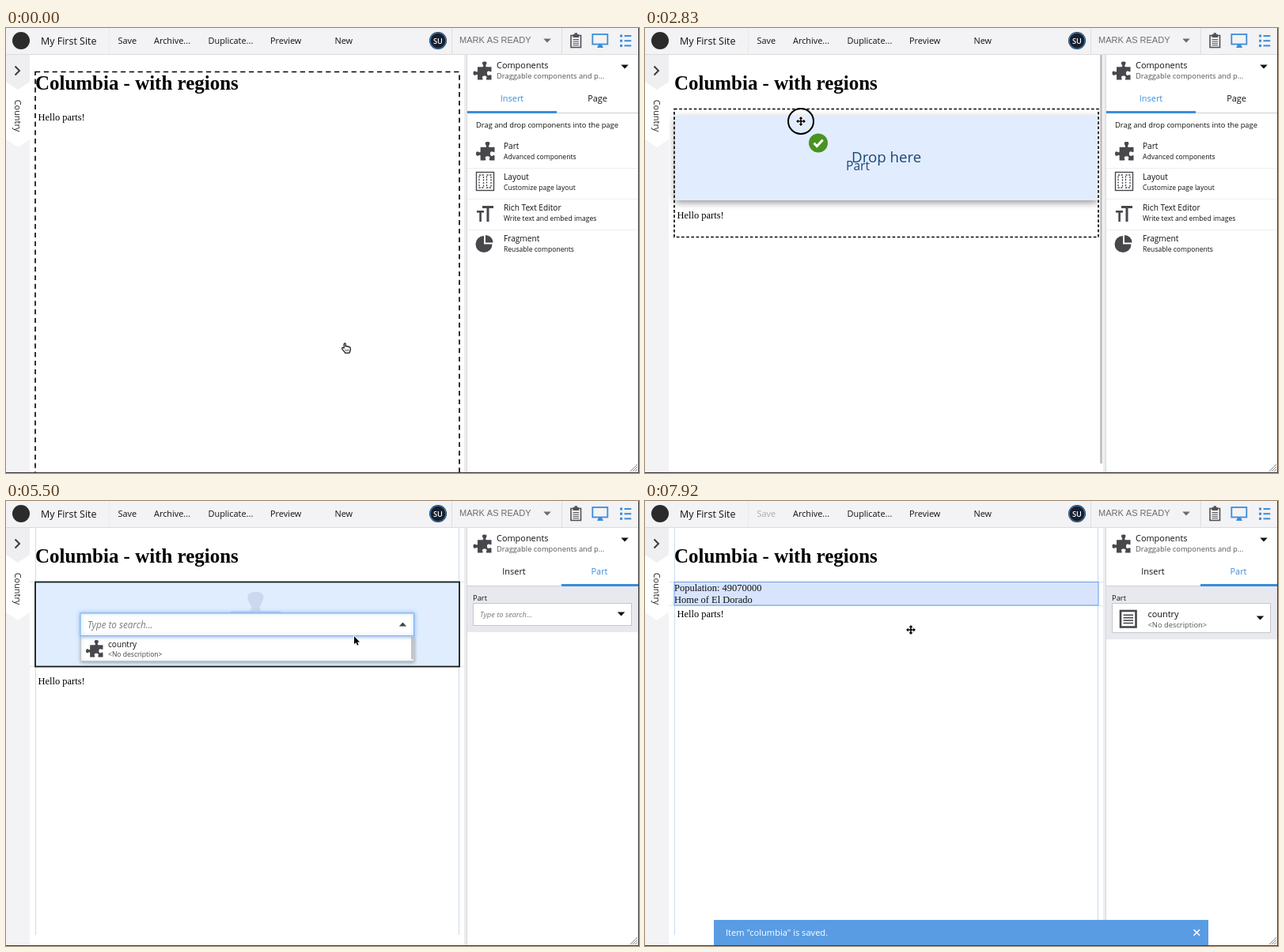
Animation, 800 px wide and 563 px high, one loop 8 s. Source, as an HTML page with a canvas:

```html
<!DOCTYPE html>
<html lang="en">
<head>
<meta charset="utf-8">
<title>Page editor</title>
<style>
html, body { margin: 0; width: 100%; height: 100%; overflow: hidden; background: #fff; }
canvas { display: block; width: 800px; height: 563px; }
</style>
</head>
<body>
<canvas id="stage" width="800" height="563"></canvas>
<script>
const ctx = document.getElementById('stage').getContext('2d');
const LOOP = 8000;
const SANS = '"Open Sans", sans-serif';
const SERIF = '"Liberation Serif", serif';
const ARIAL = '"Liberation Sans", sans-serif';
const BLUE = '#3a8ddb', ICON = '#47474c', BAR = '#f3f2f4', FORM = '#e8e9ee';

const PUZZLE = new Path2D('M24 29H50C56 29 57 25 54 19C46 6 50 0 62 0C74 0 78 6 70 19C67 25 68 29 74 29H100V52C100 56 96 57 91 54C80 48 76 56 76 64C76 72 80 80 91 74C96 71 100 73 100 77V100H76C71 100 70 96 72 92C78 84 72 78 62 78C52 78 46 84 52 92C54 96 53 100 48 100H24V77C24 71 20 70 15 73C5 79 0 73 0 64C0 55 5 49 15 55C20 58 24 57 24 51Z');
const CURSORS = {
  arrow: new Path2D('M0 0V10L2.3 8L4 11.6L5.6 10.9L4 7.4H7Z'),
  move: new Path2D('M0-6L2.5-3.2H.8V-.8H3.2V-2.5L6 0L3.2 2.5V.8H.8V3.2H2.5L0 6L-2.5 3.2H-.8V.8H-3.2V2.5L-6 0L-3.2-2.5V-.8H-.8V-3.2H-2.5Z'),
  hand: new Path2D('M-2.8 0V-5.2C-2.8-6.6-.8-6.6-.8-5.2V-2C-.4-3 1.2-2.8 1.3-1.8C2-2.5 3.2-2.1 3.3-1.2C4.2-1.7 5.3-1.2 5.3 0V2C5.3 4 4.2 5 4 6.2H-1.4C-2 4.5-4.5 2.5-5.3.8C-5.7-.4-4.4-1.1-3.6-.4Z')
};

// time, x, y
const PATH = [
  [0, 430, 405], [100, 430, 405], [780, 607, 157], [1100, 607, 157],
  [1420, 565, 147], [1680, 562, 146], [2420, 197, 118], [3600, 197, 118],
  [4420, 522, 153], [4700, 502, 157], [5300, 502, 157], [5500, 440, 171],
  [5720, 433, 175], [6720, 433, 175], [7350, 352, 132], [7550, 350, 133],
  [7900, 336, 163], [8000, 336, 163]
];

const ease = p => { p = Math.min(1, Math.max(0, p)); return p * p * (3 - 2 * p); };
const within = (t, a, b) => t >= a && t < b;

function pointerAt(t) {
  let i = 1;
  while (i < PATH.length - 1 && PATH[i][0] < t) i++;
  const [t0, x0, y0] = PATH[i - 1], [t1, x1, y1] = PATH[i];
  const k = ease((t - t0) / (t1 - t0));
  return [x0 + (x1 - x0) * k, y0 + (y1 - y0) * k];
}

function rect(x, y, w, h, fill, stroke, width = 1) {
  if (fill) { ctx.fillStyle = fill; ctx.fillRect(x, y, w, h); }
  if (stroke) { ctx.strokeStyle = stroke; ctx.lineWidth = width; ctx.strokeRect(x, y, w, h); }
}

function poly(points, fill) {
  ctx.beginPath();
  points.forEach(([x, y]) => ctx.lineTo(x, y));
  ctx.closePath();
  ctx.fillStyle = fill;
  ctx.fill();
}

function line(points, color, width) {
  ctx.beginPath();
  points.forEach(([x, y], i) => i ? ctx.lineTo(x, y) : ctx.moveTo(x, y));
  ctx.strokeStyle = color;
  ctx.lineWidth = width;
  ctx.stroke();
}

function circle(x, y, r, fill, stroke, width = 1) {
  ctx.beginPath();
  ctx.arc(x, y, r, 0, Math.PI * 2);
  if (fill) { ctx.fillStyle = fill; ctx.fill(); }
  if (stroke) { ctx.strokeStyle = stroke; ctx.lineWidth = width; ctx.stroke(); }
}

function text(s, x, y, size, color = '#111', family = SANS, style = '', align = 'left') {
  ctx.font = `${style} ${size}px ${family}`;
  ctx.textAlign = align;
  ctx.fillStyle = color;
  ctx.fillText(s, x, y);
}

function caret(x, y, color, up = false, half = 4.7) {
  const d = up ? -2.5 : 2.5;
  poly([[x - half, y - d], [x + half, y - d], [x, y + d]], color);
}

function puzzle(x, y, size, color) {
  ctx.save();
  ctx.translate(x, y);
  ctx.scale(size / 100, size / 100);
  ctx.fillStyle = color;
  ctx.fill(PUZZLE);
  ctx.restore();
}

function shadow(color, blur, dy, draw) {
  ctx.save();
  ctx.shadowColor = color;
  ctx.shadowBlur = blur;
  ctx.shadowOffsetY = dy;
  draw();
  ctx.restore();
}

function dashed(x, y, w, h, dash) {
  ctx.save();
  ctx.setLineDash(dash);
  rect(x, y, w, h, null, '#000', 1.6);
  ctx.restore();
}

function toolbar(saved) {
  rect(0, 0, 800, 33, BAR);
  rect(0, 33, 800, 1, '#dcdcde');
  rect(130, 0, 1, 33, '#e9e8ea');
  rect(563, 0, 1, 33, '#dedee0');
  rect(702, 0, 1, 33, '#dedee0');
  circle(19, 16, 11, '#2b2b2b');
  text('My First Site', 44, 21, 12.48);
  text('Save', 141.5, 20, 10.92, saved ? '#aaa' : '#111');
  text('Archive...', 187, 20, 10.92);
  text('Duplicate...', 255.5, 20, 10.92);
  text('Preview', 334, 20, 10.92);
  text('New', 415.5, 20, 10.92);
  circle(546, 16, 11, '#17202f');
  circle(546, 16, 10, null, '#3f7fb8', 1.2);
  text('SU', 546, 19.5, 9.2, '#fff', SANS, '600', 'center');
  text('MARK AS READY', 573, 19, 11, '#6c6c70', ARIAL);
  caret(684, 16, '#6c6c70');
  // clipboard
  rect(714, 9.5, 12.5, 15, null, '#515156', 1.6);
  rect(716.5, 8, 7.5, 4, '#515156');
  rect(718.5, 6.3, 3.5, 2.5, '#515156');
  for (let i = 0; i < 4; i++) rect(716.5, 14 + i * 2.4, 7.5, 1, '#515156');
  // monitor
  rect(741.3, 8, 19, 12.5, null, BLUE, 1.8);
  poly([[749, 21], [753, 21], [755, 25], [747, 25]], BLUE);
  // list
  for (let y = 9; y < 25; y += 6.2) {
    rect(776, y - .5, 3, 3, BLUE);
    rect(781.5, y, 8.7, 2, BLUE);
  }
}

function sideStrip() {
  rect(0, 34, 30, 528, BAR);
  poly([[0, 34], [30, 34], [30, 141], [15, 151], [0, 141]], '#fff');
  poly([[0, 34], [30, 34], [30, 68], [15, 78], [0, 68]], '#efeef0');
  line([[11.5, 48.5], [17, 54], [11.5, 59.5]], '#3c3c40', 2);
  ctx.save();
  ctx.translate(11, 111);
  ctx.rotate(Math.PI / 2);
  text('Country', 0, 0, 10.92, '#222', SANS, '', 'center');
  ctx.restore();
}

function insertList() {
  text('Drag and drop components into the page', 594, 126, 9.36);
  const rows = [
    ['Part', 'Advanced components'], ['Layout', 'Customize page layout'],
    ['Rich Text Editor', 'Write text and embed images'], ['Fragment', 'Reusable components']
  ];
  rows.forEach(([name, hint], i) => {
    const y = 152.7 + i * 39.1;
    text(name, 629, y, 10.14);
    text(hint, 629, y + 13, 8.58);
    if (i < 3) rect(583, Math.round(177 + i * 39), 216, 1, '#eeeef0');
  });
  puzzle(594, 144, 23.5, ICON);
  rect(594.5, 182.5, 22, 23, null, ICON, 1.4);
  ctx.save();
  ctx.setLineDash([2.2, 1.4]);
  rect(598, 186, 5.5, 16, null, ICON, 1.3);
  rect(607.5, 186, 5.5, 16, null, ICON, 1.3);
  ctx.restore();
  rect(602, 225, 14, 3, ICON);
  rect(607.5, 225, 3, 20, ICON);
  rect(595, 231, 9, 2.6, ICON);
  rect(598.3, 231, 2.6, 14, ICON);
  [[604, 273.5, 10.5, 0, Math.PI * 1.5], [606, 271.5, 9.5, -Math.PI / 2, 0]].forEach(([x, y, r, a, b]) => {
    ctx.beginPath();
    ctx.moveTo(x, y);
    ctx.arc(x, y, r, a, b);
    ctx.fillStyle = ICON;
    ctx.fill();
  });
}

function partForm(t) {
  const chosen = t >= 6000, busy = within(t, 6000, 6600);
  const h = chosen ? 38 : 29;
  rect(583, 108, 216, chosen ? 67 : 58, busy ? '#f5f5f7' : FORM);
  ctx.save();
  if (busy) ctx.globalAlpha = .42;
  text('Part', 590, 126, 9.36);
  rect(590.5, 129.5, 200, h - 1, '#fff', '#c6c7cb');
  if (chosen) {
    rect(601, 139, 19.5, 20.5, null, ICON, 2.6);
    for (let y = 143.5; y < 156; y += 3.4) rect(604.5, y, 12.5, 1.6, ICON);
    text('country', 635.5, 147, 10.92);
    text('<No description>', 635.5, 160, 9.36, '#555');
  } else {
    text('Type to search...', 599, 147, 9.36, '#777', SANS, 'italic');
  }
  caret(777.5, chosen ? 148 : 143, '#111');
  ctx.restore();
  if (busy) {
    const g = ctx.createConicGradient(.9 + (t - 6420) / 1000 * Math.PI * 2, 690, 314);
    g.addColorStop(0, '#e2e2e4');
    g.addColorStop(.4, '#c4c4c8');
    g.addColorStop(1, '#77777c');
    circle(690, 314, 16.7, null, g, 3);
  }
}

function panel(t) {
  const part = t >= 3670;
  rect(579, 34, 4, 528, '#ecebee');
  rect(582, 34, 1, 528, '#d9d9dc');
  rect(583, 34, 216, 528, '#fff');
  puzzle(590.5, 42.5, 23, ICON);
  text('Components', 620, 51, 10.92);
  text('Draggable components and p...', 620, 64, 9.36, '#555');
  caret(782, 49, '#111');
  rect(583, 107, 216, 1, '#cfcfd3');
  text('Insert', part ? 642 : 639.5, 93, 10.92, part ? '#111' : BLUE, SANS, '', 'center');
  text(part ? 'Part' : 'Page', part ? 750 : 747.5, 93, 10.92, part ? BLUE : '#111', SANS, '', 'center');
  if (part) rect(702, 105, 97, 3, BLUE);
  else rect(583, 105, 113, 3, BLUE);
  if (part) partForm(t);
  else insertList();
}

function guides(bottom) {
  const c = '#c9dbef';
  rect(37, 34, 1, 515, c);
  rect(572, 34, 1, 515, c);
  rect(30, 102, 549, 1, '#dbe6f3');
  rect(30, bottom, 549, 1, '#dbe6f3');
}

function dropZone() {
  shadow('rgba(0,0,0,.45)', 9, 3, () => rect(38, 110.5, 534, 107.5, '#e1edfe'));
  rect(572, 104, 7, 126, '#fff');
  text('Drop here', 261, 169.5, 18.72, '#1d4678');
  text('Part', 254, 180, 15.6, '#1d4678');
  dashed(37, 102.5, 536, 162, [3.6, 2.6]);
  rect(575, 34, 3, 517, '#c3c3c6');
}

function searchBox(t) {
  const open = within(t, 4790, 5920);
  rect(37, 102.5, 536, 107, '#e0edfe', '#111a16', 1.8);
  puzzle(264, 115, 83, '#cad9f0');
  if (open) {
    shadow('rgba(0,0,0,.3)', 4, 1, () => rect(94.5, 170.5, 421, 32, '#fff', '#c4c8ce'));
    puzzle(101, 176, 21.5, ICON);
    text('country', 129, 184.5, 10.14);
    text('<No description>', 129, 196.5, 8.58, '#444');
    rect(512, 172, 3, 28, '#c4c4c8');
  }
  shadow('rgba(80,150,240,.6)', 5, 0, () => rect(94, 142, 421.5, 28.5, '#fff', '#83b5f0', 1.2));
  text('Type to search...', 103, 161, 11.7, '#7d7d80', SANS, 'italic');
  caret(501.5, 156, '#444', open);
}

function page(t) {
  const faded = within(t, 1050, 1600);
  const ink = faded ? '#8c8c8c' : '#000';
  const hello = t < 1830 ? 117 : t < 3420 ? 241 : t < 6000 ? 232 : 147;
  rect(30, 34, 549, 528, '#fff');
  if (t >= 3420) guides(t < 6000 ? 209 : 132);
  if (t < 600) dashed(37, 55.5, 536, 530, [6.2, 4.6]);
  if (within(t, 1830, 3420)) dropZone();
  if (within(t, 3420, 6000)) searchBox(t);
  if (t >= 6000) {
    rect(37, 102.5, 536, 29.5, '#d8e4fc', '#6fa3e8', 1.1);
    text('Population: 49070000', 37, 113.5, 12.48, '#111', SERIF);
    text('Home of El Dorado', 37, 128.5, 12.48, '#111', SERIF);
  }
  text('Columbia - with regions', 37, 77.5, 24.96, ink, SERIF, 'bold');
  text('Hello parts!', 40.5, hello, 12.48, ink, SERIF);
}

function notice(t) {
  const h = 32 * ease((t - 6028) / 700);
  if (h <= 0) return;
  const mid = 562 - h / 2;
  ctx.save();
  ctx.beginPath();
  ctx.rect(87, 562 - h, 625, h);
  ctx.clip();
  rect(87, 562 - h, 625, h, '#5a9ce3');
  text('Item "columbia" is saved.', 102, mid + 4, 11.1, '#fff');
  line([[693.5, mid - 3.7], [701, mid + 3.7]], '#fff', 1.6);
  line([[701, mid - 3.7], [693.5, mid + 3.7]], '#fff', 1.6);
  ctx.restore();
}

function badge(x, y, allowed) {
  if (allowed) {
    circle(x, y, 12, '#4a9322');
    line([[x - 5.5, y], [x - 1.7, y + 4], [x + 5.7, y - 4]], '#fff', 3);
  } else {
    circle(x, y, 12, '#b90000');
    circle(x, y, 7, null, '#fff', 2.2);
    line([[x - 5, y - 5], [x + 5, y + 5]], '#fff', 2.2);
  }
}

function pointer(t) {
  const [x, y] = pointerAt(t);
  const inside = t >= 1790;
  if (within(t, 1050, 3420)) badge(x + (inside ? 22 : 39), y + 27.5, inside);
  const pressed = within(t, 920, 3420) || within(t, 4720, 4880) || within(t, 5800, 5950);
  if (pressed) circle(x, y, 16, null, '#000', 2);
  const kind = t < 920 ? 'hand'
    : inside && t < 4500 || t >= 6000 ? 'move' : 'arrow';
  const shape = CURSORS[kind];
  ctx.save();
  ctx.translate(x, y);
  ctx.lineJoin = 'round';
  ctx.strokeStyle = kind === 'hand' ? '#111' : '#fff';
  ctx.lineWidth = kind === 'hand' ? 1.2 : 1.6;
  ctx.fillStyle = kind === 'hand' ? '#fff' : '#000';
  if (kind !== 'hand') ctx.stroke(shape);
  ctx.fill(shape);
  if (kind === 'hand') {
    ctx.stroke(shape);
    for (let i = -1; i < 4; i += 2) line([[i, 1.5], [i, 4]], '#111', .7);
  }
  ctx.restore();
}

function frameEdges() {
  rect(0, 562, 800, 1, '#3a3a3c');
  rect(799, 0, 1, 563, '#3a3a3c');
  for (let d = 3; d < 10; d += 3) line([[798 - d, 561], [798, 561 - d]], '#888', 1);
}

function draw(t) {
  ctx.clearRect(0, 0, 800, 563);
  page(t);
  sideStrip();
  panel(t);
  toolbar(t >= 6100);
  notice(t);
  frameEdges();
  pointer(t);
}

const start = performance.now();
function tick() {
  draw((performance.now() - start) % LOOP);
  requestAnimationFrame(tick);
}
tick();
</script>
</body>
</html>
```
